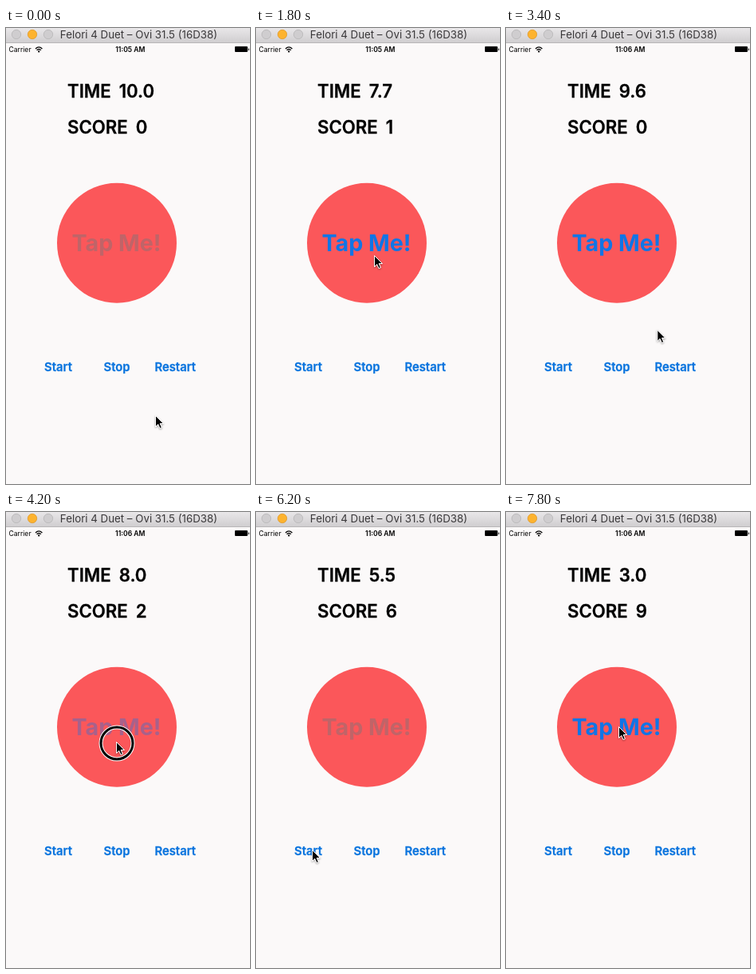
Animation, 306 px wide and 570 px high, one loop 8000 ms. Source, as an HTML page:

```html
<!DOCTYPE html>
<html lang="en">
<head>
<meta charset="utf-8">
<title>Tap game</title>
<style>
  html, body { margin: 0; width: 100%; height: 100%; overflow: hidden; background: #fbf9f9; }
  svg { display: block; width: 100%; height: 100%; }
  text { font-family: Inter, "Open Sans", sans-serif; white-space: pre; }
  .mid, .button, #label { text-anchor: middle; }
  .stat { font-size: 22.2px; font-weight: 600; word-spacing: -.6px; stroke: #000; stroke-width: .3px; }
  .status { font-size: 8.6px; }
  .button { font-size: 14.8px; font-weight: 600; fill: #0a74de; stroke: #0a74de; stroke-width: .3px; }
  #label { font-size: 28.7px; font-weight: 700; }
</style>
</head>
<body>
<svg viewBox="0 0 306 570">
  <defs>
    <linearGradient id="bar" x2="0" y2="1">
      <stop stop-color="#e9e7e9"/><stop offset="1" stop-color="#d0ced0"/>
    </linearGradient>
    <filter id="shadow" x="-50%" y="-50%" width="200%" height="200%">
      <feDropShadow dx="0" dy="1" stdDeviation="1" flood-opacity=".4"/>
    </filter>
  </defs>
  <rect width="306" height="570" fill="#fbf9f9"/>

  <rect width="306" height="18" fill="url(#bar)"/>
  <path d="M0 18.5H306" stroke="#b8b6b8"/>
  <g stroke-width=".8" fill="#cfcdcf" stroke="#b7b5b7">
    <circle cx="13" cy="8" r="5.7"/>
    <circle cx="33" cy="8" r="5.7" fill="#fdb32f" stroke="#e09a2a"/>
    <circle cx="53" cy="8" r="5.7"/>
  </g>
  <text class="mid" x="166.5" y="12.6" font-size="13.3" fill="#3a383a">Felori 4 Duet – Ovi 31.5 (16D38)</text>

  <text class="status" x="3.5" y="30">Carrier</text>
  <g fill="none" stroke="#000" stroke-width="1.3">
    <path d="M37 26Q41.2 21.8 45.4 26M38.6 27.8Q41.2 25.2 43.8 27.8"/>
    <circle cx="41.2" cy="29.4" r=".5"/>
  </g>
  <text class="status mid" id="clock" x="155.8" y="30" font-weight="600"></text>
  <rect x="287" y="23" width="16" height="7" rx="1"/>
  <path d="M304.3 25.5v2.5" stroke="#000"/>

  <text class="stat" id="time" x="77" y="87"></text>
  <text class="stat" id="score" x="77" y="132"></text>

  <circle cx="139" cy="268.8" r="75" fill="#fb575a"/>
  <text id="label" x="138.5" y="279">Tap Me!</text>
  <text class="button" id="start" x="65.5" y="429">Start</text>
  <text class="button" id="stop" x="139" y="429">Stop</text>
  <text class="button" id="restart" x="212.3" y="429">Restart</text>

  <g id="pointer">
    <g id="ring" fill="none">
      <circle cx="1" cy="2" r="20" stroke="#fff" stroke-width="5"/>
      <circle cx="1" cy="2" r="20" stroke="#000" stroke-width="3"/>
    </g>
    <path d="M.5 .5V14.5L3.8 11.4 6 16.5 8.4 15.5 6.2 10.5H10.5Z"
          stroke="#fff" filter="url(#shadow)"/>
  </g>
</svg>
<script>
const LOOP = 8000, STEP = 200, GAME_SPEED = 2, GAME_SECONDS = 10;
const el = id => document.getElementById(id);

// Where the pointer rests and what it does there
const visits = [
  { from: 0, to: 200, x: 187, y: 484 },
  { from: 600, to: 1000, x: 67, y: 422, button: "start", press: 650 },
  { from: 1600, to: 2200, x: 148, y: 284, taps: true },
  { from: 2950, to: 3200, x: 215, y: 422, button: "restart", press: 3200 },
  { from: 3800, to: 5000, x: 138, y: 287, taps: true },
  { from: 5400, to: 5600, x: 138, y: 420, button: "stop", press: 5450 },
  { from: 6200, to: 6800, x: 70, y: 422, button: "start", press: 6550 },
  { from: 7200, to: LOOP, x: 141, y: 268, taps: true }
];

function pointerAt(t) {
  const i = visits.findLastIndex(v => v.from <= t);
  const here = visits[i], next = visits[i + 1] || here;
  const k = t <= here.to ? 0 : (t - here.to) / (next.from - here.to);
  return [here.x + (next.x - here.x) * k, here.y + (next.y - here.y) * k];
}

// Replays every visit up to time t.
function gameAt(t) {
  let spent = 0, score = 0, since = null;
  for (const v of visits) {
    if (v.taps && v.from < t) score += (Math.min(t, v.to) - v.from) / STEP;
    if (!v.button || v.press > t) continue;
    if (v.button === "restart") spent = score = 0;
    if (v.button === "stop") spent += v.press - since;
    since = v.button === "stop" ? null : v.press;
  }
  if (since !== null) spent += t - since;
  return { score, active: since !== null, left: GAME_SECONDS - spent * GAME_SPEED / 1000 };
}

function draw() {
  const t = Math.floor(performance.now() % LOOP / STEP) * STEP;
  const game = gameAt(t);
  const tapping = visits.find(v => v.taps && v.from <= t && t <= v.to);
  const tapDown = tapping && t < tapping.to && (t - tapping.from) / STEP % 2 === 0;
  const clicked = visits.find(v => Math.abs(t - v.press) < STEP / 2);

  el("time").textContent = "TIME  " + game.left.toFixed(1);
  el("score").textContent = "SCORE  " + game.score;
  el("clock").textContent = t < 3000 ? "11:05 AM" : "11:06 AM";

  const fading = tapping && t === tapping.to;
  el("label").setAttribute("fill", game.active ? "#1075e6" : "#c06468");
  el("label").setAttribute("opacity", tapDown ? .35 : fading ? .65 : 1);
  for (const id of ["start", "stop", "restart"])
    el(id).setAttribute("opacity", clicked?.button === id ? .3 : 1);

  el("ring").setAttribute("visibility", tapDown || clicked ? "visible" : "hidden");
  el("pointer").setAttribute("transform", `translate(${pointerAt(t)})`);
  requestAnimationFrame(draw);
}
draw();
</script>
</body>
</html>
```
